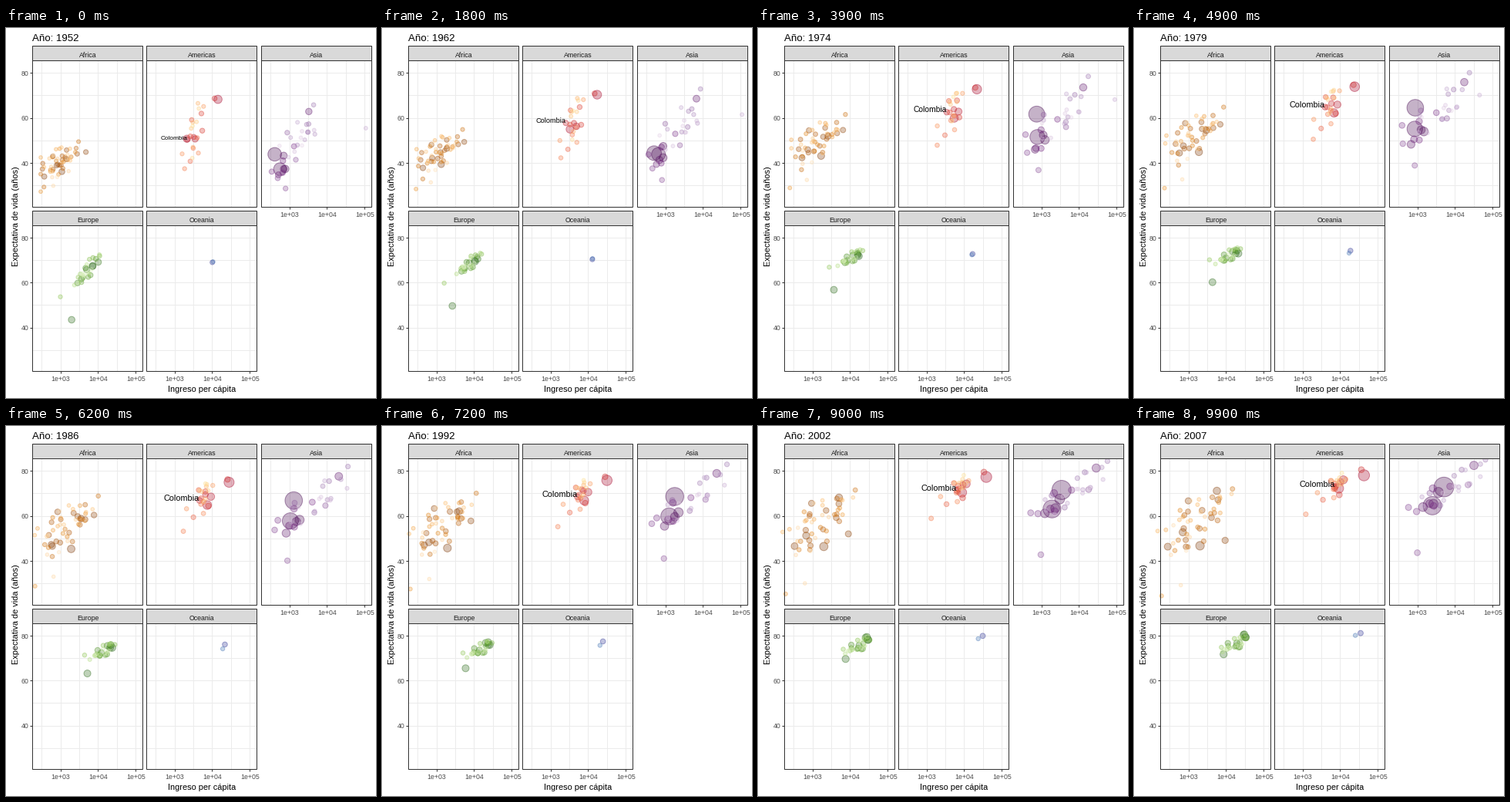
These frames come from a looping animation (480x480 px, 10 s). A matplotlib script:

```python
import numpy as np
import matplotlib.pyplot as plt
from matplotlib.animation import FuncAnimation
from matplotlib.colors import LinearSegmentedColormap
from matplotlib.patches import Rectangle

plt.rcParams["font.family"] = "Liberation Sans"

FRAMES = 100
YEARS = np.linspace(1952, 2007, FRAMES)
STAGES = (1952, 1967, 1987, 2007)
W, H, STRIP = 143, 189.5, 19
COLS, ROWS = (34.5, 182.5, 331.5), (42.5, 256)
X_MIN, X_SCALE = 2.2487, W / 2.94
Y_MAX, Y_SCALE = 85.553, H / 64.9
BIGGEST = 1319

fig = plt.figure(figsize=(480 / 72, 480 / 72), dpi=72, facecolor="white")
ax = fig.add_axes([0, 0, 1, 1])
ax.set(xlim=(0, 480), ylim=(480, 0))
ax.axis("off")


def px(left, log_gdp):
    return left + (log_gdp - X_MIN) * X_SCALE


def py(top, life):
    return top + (Y_MAX - life) * Y_SCALE


def crisp(v):
    """Centre of the pixel that holds v."""
    return np.floor(v) + 0.5


def text(x, y, s, size, color="black", ha="center", **kw):
    return ax.text(x, y, s, size=size, color=color, ha=ha, va="baseline", **kw)


def line(xs, ys, color, z):
    ax.plot(crisp(xs), crisp(ys), color=color, lw=1, zorder=z,
            solid_capstyle="butt", snap=False)


def box(x0, y0, x1, y1, face):
    x0, y0, x1, y1 = crisp([x0, y0, x1, y1])
    ax.add_patch(Rectangle((x0, y0), x1 - x0, y1 - y0, fc=face, ec="#333333",
                           lw=1, zorder=4, snap=False))


def panel(name, left, top, x_axis=False, y_axis=False):
    right, bottom = left + W, top + H
    for v in np.arange(2.5, 5.1, 0.5):
        x = px(left, v)
        line([x, x], [top, bottom], "#ebebeb", 1)
    for v in range(30, 81, 10):
        y = py(top, v)
        line([left, right], [y, y], "#ebebeb", 1)
    box(left, top, right, bottom, "none")
    box(left, top - STRIP, right, top, "#d9d9d9")
    text(left + W / 2, top - 4.5, name, 8.8, "#1a1a1a", zorder=5)
    if x_axis:
        for v in (3, 4, 5):
            x = px(left, v)
            line([x, x], [bottom, bottom + 3], "#333333", 3)
            text(x, bottom + 13, f"1e+0{v}", 8.8, "#4d4d4d")
    if y_axis:
        for v in (40, 60, 80):
            y = py(top, v)
            line([left - 3, left], [y, y], "#333333", 3)
            text(left - 5, y + 3.3, v, 8.8, "#4d4d4d", ha="right")


def follow(points):
    """Track through (year, log gdp, life) key points."""
    years, gdp, life = zip(*points)
    return np.stack([np.interp(YEARS, years, gdp), np.interp(YEARS, years, life)], -1)


def crowd(n, seed, gdp, gdp_sd, life, life_sd, rho):
    """n drifting dots: moving centre and spread, richer ones living longer."""
    rng = np.random.default_rng(seed)
    stage = lambda v: np.interp(YEARS, STAGES, v)[:, None]
    turn = np.linspace(0, 0.8, FRAMES)[:, None]

    def wander():
        a, b = np.clip(rng.normal(size=(2, n)), -1.8, 1.8)
        return a * np.cos(turn) + b * np.sin(turn)

    zx, zy = wander(), wander()
    zy = rho * zx + np.sqrt(1 - rho ** 2) * zy
    x = stage(gdp) + stage(gdp_sd) * zx
    y = stage(life) + stage(life_sd) * zy
    return np.stack([x, y], -1)


class Continent:
    def __init__(self, name, col, row, ramp, growth, leads, small=(), pops=(1, 1), **axes):
        left, top = COLS[col], ROWS[row]
        panel(name, left, top, **axes)
        people = [pop for pop, *_ in leads]
        spots = np.stack([follow(points) for _, *points in leads], 1)
        if small:
            spots = np.concatenate([spots, crowd(*small)], 1)
            people += list(np.geomspace(*pops, small[0]))
        self.spots = np.stack([px(left, spots[..., 0]), py(top, spots[..., 1])], -1)

        people = np.array(people)
        age = np.linspace(0, 1, FRAMES)[:, None]
        start = np.sqrt(growth)
        self.size = 2 + 10 * np.sqrt(people / BIGGEST) * (start + (1 - start) * age)

        rank = np.argsort(np.argsort(-people))
        cmap = LinearSegmentedColormap.from_list(name, ramp.split())
        self.colors = cmap(rank / (len(people) - 1))


africa = Continent(
    "Africa", 0, 0, "#7f3b08 #b35806 #e08214 #fdb863 #fee0b6", 0.25,
    [(135, (1952, 3.03, 36.3), (1979, 3.27, 45), (2007, 3.3, 46.9)),
     (80, (1952, 3.15, 41.9), (1979, 3.47, 54.5), (2007, 3.75, 71.3)),
     (76, (1952, 2.56, 34.1), (1979, 2.75, 44.5), (2007, 2.84, 52.9)),
     (65, (1952, 2.89, 39.1), (1979, 2.86, 47.8), (2007, 2.44, 46.5)),
     (44, (1952, 3.67, 45), (1987, 3.89, 60.8), (2007, 3.97, 49.3))],
    (47, 4, (2.97, 3.12, 3.17, 3.24), (0.28, 0.34, 0.4, 0.46),
     (39.3, 45.3, 53.3, 55), (5, 5.8, 7.8, 9.5), 0.5),
    (42, 0.2), y_axis=True)

americas = Continent(
    "Americas", 1, 0, "#a50026 #d73027 #f46d43 #fdae61 #fee090", 0.4,
    [(301, (1952, 4.15, 68.4), (1979, 4.38, 74), (2007, 4.63, 78.2)),
     (190, (1952, 3.32, 50.9), (1979, 3.83, 62.3), (2007, 3.96, 72.4)),
     (109, (1952, 3.54, 50.8), (1979, 3.92, 66), (2007, 4.08, 76.2)),
     (44, (1952, 3.33, 50.6), (1962, 3.4, 57.9), (1979, 3.59, 64.9), (2007, 3.85, 72.9)),
     (33, (1952, 4.06, 68.8), (1979, 4.35, 74.8), (2007, 4.56, 80.7)),
     (8.5, (1952, 3.26, 37.6), (1979, 3.28, 50.6), (2007, 3.08, 60.9))],
    (19, 11, (3.5, 3.64, 3.75, 3.9), (0.17, 0.18, 0.19, 0.22),
     (53, 60.5, 68.5, 73.6), (9, 7, 4.6, 3.2), 0.6),
    (40, 1))

asia = Continent(
    "Asia", 2, 0, "#40004b #762a83 #9970ab #c2a5cf #e7d4e8", 0.39,
    [(1319, (1952, 2.6, 44), (1957, 2.76, 50.5), (1962, 2.69, 44.5), (1967, 2.79, 58.4),
      (1979, 2.93, 64.6), (1997, 3.36, 70.4), (2007, 3.7, 73)),
     (1110, (1952, 2.74, 37.4), (1979, 2.92, 55.2), (1997, 3.16, 61.8), (2007, 3.39, 64.7)),
     (224, (1952, 2.88, 37.5), (1962, 2.93, 42.5), (1979, 3.16, 54), (2007, 3.55, 70.6)),
     (169, (1952, 2.84, 43.4), (1979, 3.09, 54.8), (2007, 3.42, 65.5)),
     (150, (1952, 2.84, 37.5), (1979, 2.82, 48.3), (2007, 3.14, 64.1)),
     (127, (1952, 3.51, 63), (1962, 3.82, 68.7), (1979, 4.24, 76), (2007, 4.5, 82.6)),
     (48, (1952, 2.52, 36.3), (1979, 2.58, 56.8), (2007, 2.97, 62.1)),
     (32, (1952, 2.89, 28.8), (1979, 2.92, 39), (2007, 2.99, 43.8)),
     (2.5, (1952, 5.03, 55.6), (1972, 5.04, 67.7), (1982, 4.5, 71.3), (2007, 4.67, 77.6))],
    (24, 8, (3.22, 3.44, 3.7, 3.9), (0.3, 0.38, 0.45, 0.45),
     (49, 56.5, 66, 72), (7.5, 8, 6.2, 5.2), 0.7),
    (91, 0.7), x_axis=True)

europe = Continent(
    "Europe", 0, 1, "#276419 #4d9221 #7fbc41 #b8e186 #e6f5d0", 0.75,
    [(82, (1952, 3.85, 67.5), (1979, 4.32, 73), (2007, 4.51, 79.4)),
     (71, (1952, 3.29, 43.6), (1979, 3.63, 60.2), (2007, 3.93, 71.8)),
     (61, (1952, 3.85, 67.4), (1979, 4.28, 74.2), (2007, 4.48, 80.7)),
     (60, (1952, 4, 69.2), (1979, 4.25, 73), (2007, 4.52, 79.4)),
     (58, (1952, 3.69, 65.9), (1979, 4.17, 73.8), (2007, 4.46, 80.5)),
     (4.5, (1952, 2.99, 53.8), (1979, 3.55, 70.2), (2007, 3.87, 74.9))],
    (24, 5, (3.71, 3.98, 4.19, 4.34), (0.2, 0.19, 0.2, 0.22),
     (65, 70.2, 73.8, 77.5), (4.2, 2.2, 2.4, 2.6), 0.8),
    (40, 0.3), x_axis=True, y_axis=True)

oceania = Continent(
    "Oceania", 1, 1, "#313695 #4575b4", 0.45,
    [(20, (1952, 4, 69.1), (1967, 4.16, 71.1), (1987, 4.34, 76.3), (2007, 4.54, 81.2)),
     (4, (1952, 4.02, 69.4), (1967, 4.16, 71.5), (1987, 4.28, 74.3), (2007, 4.4, 80.2))],
    x_axis=True)

text(254, 472.5, "Ingreso per cápita", 11)
text(16, 244, "Expectativa de vida (años)", 11, rotation=90, rotation_mode="anchor")
title = text(34, 17, "", 13.2, ha="left")

world = (africa, americas, asia, europe, oceania)
spots = np.concatenate([c.spots for c in world], axis=1)
sizes = np.concatenate([c.size for c in world], axis=1)
areas = (0.75 * 2.845 * sizes) ** 2
fill = np.concatenate([c.colors for c in world])
edge = fill.copy()
fill[:, 3], edge[:, 3] = 0.3, 0.42
dots = ax.scatter(*spots[0].T, s=areas[0], facecolors=fill, edgecolors=edge,
                  linewidths=1, zorder=2)

label_at = americas.spots[:, 3]
label_size = np.interp(YEARS, (1952, 1979, 2007), (8.2, 10.8, 10.9))
label = text(0, 0, "Colombia", 9, ha="right", zorder=3)


def draw(i):
    title.set_text(f"Año: {round(YEARS[i])}")
    dots.set_offsets(spots[i])
    dots.set_sizes(areas[i])
    label.set_position(label_at[i])
    label.set_size(label_size[i])
    return title, dots, label


anim = FuncAnimation(fig, draw, frames=FRAMES, interval=100, repeat=True, repeat_delay=0)
plt.show()
```
